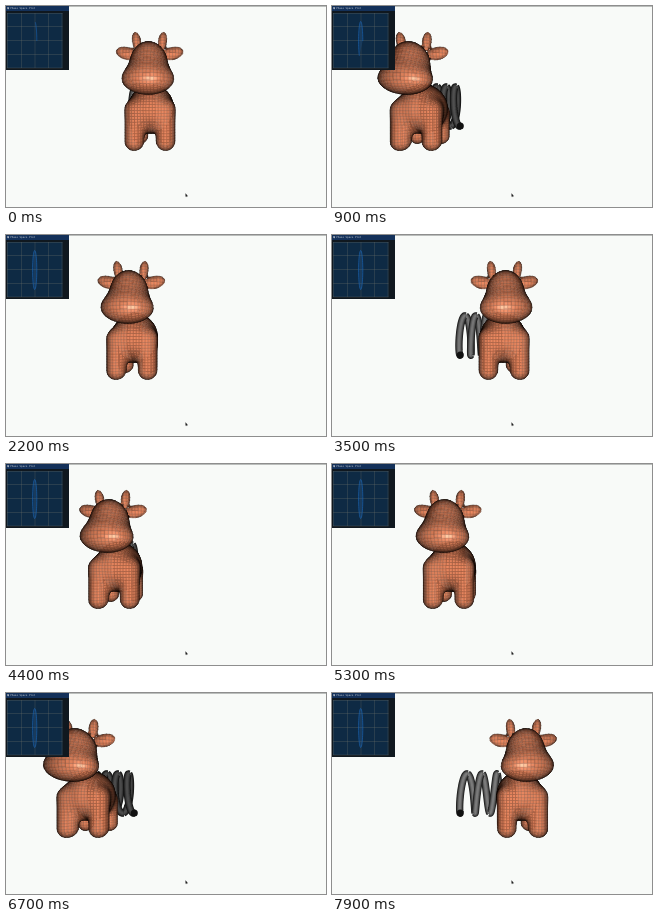
Write an HTML page with a canvas that moves like this. It is 320 px wide and 201 px high and loops after 8 s.

```html
<!DOCTYPE html>
<html>
<head>
<meta charset="utf-8">
<style>
  html, body { margin: 0; width: 100%; height: 100%; overflow: hidden; background: #f8faf8; }
  canvas, svg { position: absolute; left: 0; top: 0; width: 100%; height: 100%; display: block; }
</style>
</head>
<body>
<canvas id="scene"></canvas>
<svg viewBox="0 0 320 201" preserveAspectRatio="none">
  <path d="M0 .3H320" stroke="#8d908f" stroke-width=".7"/>
  <rect width="63" height="64" fill="#10181f"/>
  <rect width="63" height="5" fill="#14315a"/>
  <path d="M1 1.5H3.2L2.1 3.6Z" fill="#e8ecf0"/>
  <text x="4.2" y="3.4" font-size="2.6" fill="#c3ccd6" font-family="'DejaVu Sans Mono', 'Noto Sans Mono', monospace">Phase Space Plot</text>
  <rect x="1" y="7" width="55.5" height="55" fill="#0e2a44"/>
  <path d="M1.5 7V62M15.5 7V62M29 7V62M42.5 7V62M56 7V62M1 7.5H56.5M1 20.5H56.5M1 34.5H56.5M1 48.5H56.5M1 62H56.5" stroke="#6c7068" stroke-opacity=".6" stroke-width=".5"/>
  <polyline id="trail" fill="#1761ad" fill-opacity=".2" stroke="#1a62ae" stroke-width=".7"/>
  <path d="M179.6 187.6V190.6L180.3 190L180.8 191L181.3 190.7L180.8 189.8H181.6Z" fill="#111" stroke="#555" stroke-width=".3"/>
</svg>
<script>
const WIDTH = 320, HEIGHT = 201, LOOP = 8000, STEP = 100;
const PERIOD = 2107, PEAK = 1667, MIDDLE = 122.5, SWING = 75.5;
const CENTER_X = 158, CENTER_Y = 100.5, CAMERA = 200, FOCAL = 168;
const ANCHOR_X = -38, SPRING_Z = -15, TAU = Math.PI * 2;

const canvas = document.getElementById('scene');
const trail = document.getElementById('trail');
const ctx = canvas.getContext('2d');
const density = Math.max(1, window.devicePixelRatio || 1);
canvas.width = WIDTH * density;
canvas.height = HEIGHT * density;
ctx.scale(density, density);
ctx.lineJoin = 'round';

const depthScale = z => FOCAL / (CAMERA - z);
const project = (x, y, z) => [CENTER_X + x * depthScale(z), CENTER_Y + y * depthScale(z)];

// Distance fields.
function ellipsoid(p, c, r, tilt = 0) {
  const dx = p[0] - c[0], dy = p[1] - c[1];
  const cos = Math.cos(tilt), sin = Math.sin(tilt);
  const x = (dx * cos + dy * sin) / r[0], y = (dy * cos - dx * sin) / r[1], z = (p[2] - c[2]) / r[2];
  const length = Math.hypot(x, y, z);
  return length * (length - 1) / (Math.hypot(x / r[0], y / r[1], z / r[2]) || 1);
}

function leg(p, x, top, bottom, z, radius) {
  const y = Math.max(top, Math.min(bottom, p[1]));
  return Math.hypot(p[0] - x, p[1] - y, p[2] - z) - radius;
}

function blend(a, b, soft) {
  const h = Math.max(0, soft - Math.abs(a - b)) / soft;
  return Math.min(a, b) - h * h * soft / 4;
}

// The cow is symmetric, so only its right half is described.
function cowField([x, y, z]) {
  const p = [Math.abs(x), y, z];
  let head = blend(ellipsoid(p, [0, -46, 20], [19.5, 22.5, 18]), ellipsoid(p, [0, -28, 30], [26, 15.5, 17]), 14);
  head = blend(head, ellipsoid(p, [26, -60, 10], [12, 6.8, 5], -.25), 4);
  head = blend(head, ellipsoid(p, [14.5, -73, 12], [4.6, 10, 4.6], .15), 4);
  let body = ellipsoid(p, [0, 3, -17], [28.5, 31, 35]);
  body = blend(body, leg(p, 18, 4, 40, 5, 10.8), 10);
  body = blend(body, leg(p, 17, 10, 42, -38, 10), 8);
  return blend(head, body, 3);
}

function gradient(p) {
  const n = [0, 1, 2].map(axis => {
    const a = p.slice(), b = p.slice();
    a[axis] += .4;
    b[axis] -= .4;
    return cowField(a) - cowField(b);
  });
  const size = Math.hypot(...n) || 1;
  return n.map(v => v / size);
}

// Surface net: cells crossed by the surface become vertices, crossed edges become quads.
function buildMesh() {
  const cell = 3.2, low = [-46.4, -90, -62], count = [30, 46, 38];
  const toSpace = g => g.map((v, axis) => low[axis] + v * cell);
  const index = g => (g[0] * count[1] + g[1]) * count[2] + g[2];
  const values = [], vertices = new Map(), quads = [];
  const eachPoint = visit => {
    for (let i = 0; i < count[0]; i++)
      for (let j = 0; j < count[1]; j++)
        for (let k = 0; k < count[2]; k++) visit([i, j, k]);
  };
  const vertex = g => {
    const key = index(g);
    if (!vertices.has(key)) {
      let p = toSpace(g.map(v => v + .5));
      for (let pass = 0; pass < 4; pass++) {
        const n = gradient(p), gap = cowField(p);
        p = p.map((v, axis) => v - n[axis] * gap * .9);
      }
      vertices.set(key, p);
    }
    return vertices.get(key);
  };
  const shift = (g, axis, by) => g.map((v, i) => i === axis ? v + by : v);

  eachPoint(g => { values[index(g)] = cowField(toSpace(g)); });
  eachPoint(g => {
    for (let axis = 0; axis < 3; axis++) {
      if (g[axis] + 1 >= count[axis]) continue;
      const next = shift(g, axis, 1);
      if ((values[index(g)] < 0) === (values[index(next)] < 0)) continue;
      const u = (axis + 1) % 3, v = (axis + 2) % 3, back = shift(g, u, -1);
      const corners = [g, back, shift(back, v, -1), shift(g, v, -1)].map(vertex);
      const center = [0, 1, 2].map(i => corners.reduce((sum, c) => sum + c[i] / 4, 0));
      quads.push({ corners, center, normal: gradient(center) });
    }
  });
  return quads.sort((a, b) => a.center[2] - b.center[2]);
}
const cow = buildMesh();

function drawCow(offset) {
  ctx.lineWidth = .4;
  for (const { corners, center, normal } of cow) {
    const view = [-offset - center[0], -center[1], CAMERA - center[2]];
    const facing = normal.reduce((sum, n, i) => sum + n * view[i], 0) / Math.hypot(...view);
    if (facing <= -.1) continue;
    const lit = Math.max(0, facing);
    const light = .04 + .94 * Math.pow(lit, .9);
    const shine = center[2] > 25 ? 70 * Math.pow(lit, 50) : 0;
    const rgb = [240, 139, 98].map(v => v * light + shine);
    const shade = k => `rgb(${rgb.map(v => Math.min(255, Math.round(v * k)))})`;
    ctx.beginPath();
    for (const [x, y, z] of corners) ctx.lineTo(...project(x + offset, y, z));
    ctx.closePath();
    ctx.fillStyle = shade(1);
    ctx.strokeStyle = shade(.68);
    ctx.fill();
    ctx.stroke();
  }
}

function drawSpring(offset) {
  const strands = 8, radius = 25, steps = 24;
  const point = turn => {
    const angle = turn * Math.PI;
    return project(
      ANCHOR_X + (offset - ANCHOR_X) * turn / strands,
      radius * Math.cos(angle),
      SPRING_Z + radius * Math.sin(angle)
    );
  };
  const side = Math.max(-1, Math.min(1, (offset - ANCHOR_X) / 70));
  const gray = 96 + 26 * side;
  const layers = [[9.4, .22], [7.6, .5], [5.4, .8], [2.8, 1]];
  const drawStrand = (first, nearness) => {
    ctx.beginPath();
    for (let i = 0; i <= steps; i++) ctx.lineTo(...point(first + i / steps));
    for (const [width, tone] of layers) {
      const level = Math.round(gray * tone);
      ctx.lineWidth = width * depthScale(SPRING_Z + nearness);
      ctx.strokeStyle = `rgb(${level},${level},${level})`;
      ctx.stroke();
    }
  };
  for (let i = 1; i < strands; i += 2) drawStrand(i, 0);
  for (let i = 0; i < strands; i += 2) drawStrand(i, 0);
  ctx.beginPath();
  ctx.arc(...point(0), 3.5, 0, TAU);
  ctx.fillStyle = '#111';
  ctx.fill();
}

function drawTrail(phase) {
  const end = Math.min(phase, TAU), steps = 48, points = [];
  for (let i = 0; i <= steps; i++) {
    const angle = end * i / steps;
    points.push(`${(28.7 + 2.1 * Math.cos(angle)).toFixed(2)},${(35 - 19.5 * Math.sin(angle)).toFixed(2)}`);
  }
  trail.setAttribute('points', points.join(' '));
}

function render(time) {
  const phase = (time - PEAK) / PERIOD * TAU + TAU;
  const offset = MIDDLE + SWING * Math.cos(phase) - CENTER_X;
  ctx.fillStyle = '#f8faf8';
  ctx.fillRect(0, 0, WIDTH, HEIGHT);
  drawSpring(offset);
  drawCow(offset);
  drawTrail(phase);
}

const began = performance.now();
let shown = -1;
function tick() {
  const time = Math.floor((performance.now() - began) % LOOP / STEP) * STEP;
  if (time !== shown) render(shown = time);
  requestAnimationFrame(tick);
}
tick();
</script>
</body>
</html>
```
